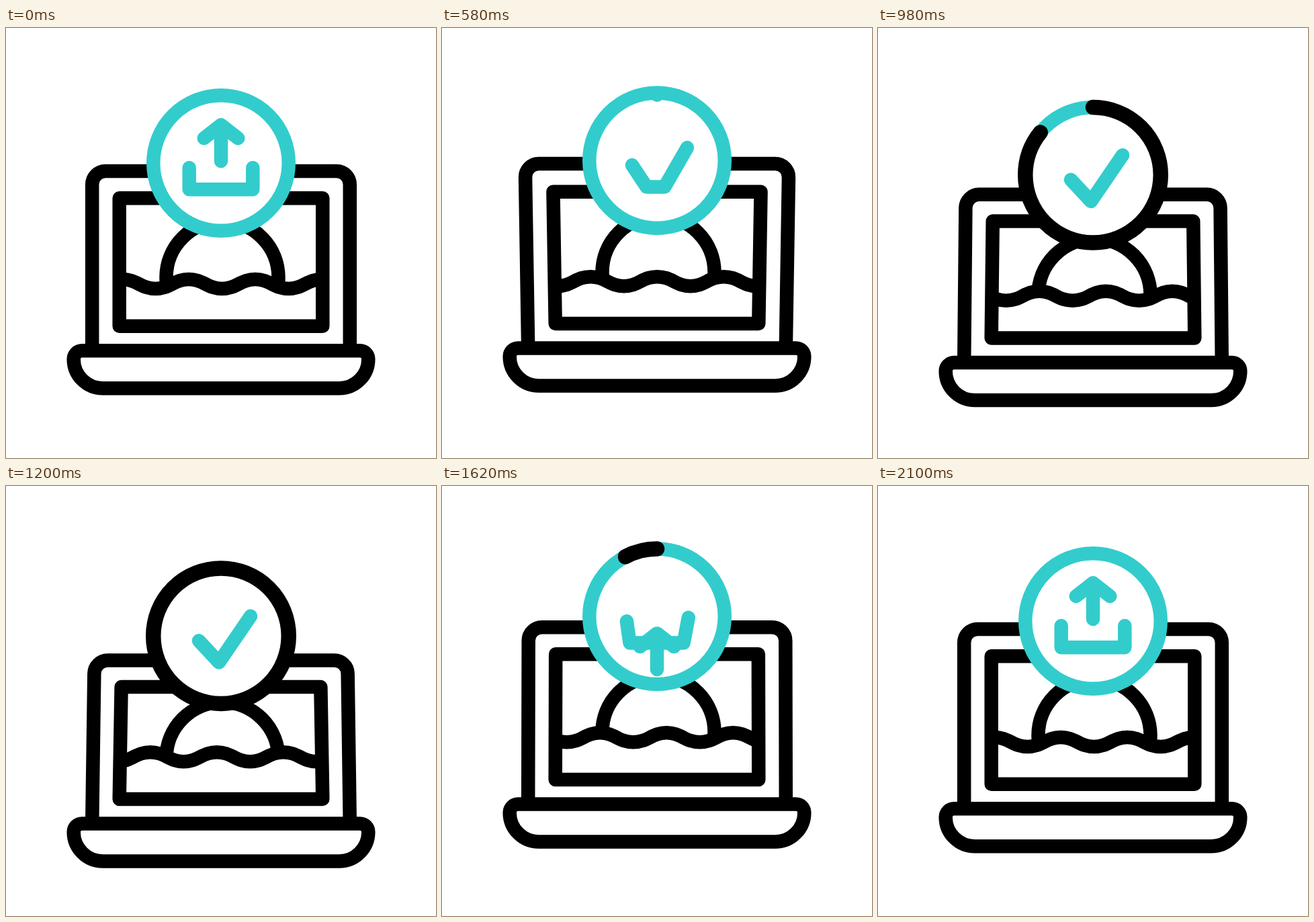
An HTML page with a canvas that plays this animation: 640x640 px, repeating every 2300 ms.

```html
<!DOCTYPE html>
<html lang="en">
<head>
<meta charset="utf-8">
<title>Upload</title>
<style>
html, body { margin: 0; height: 100%; overflow: hidden; background: #fff; }
canvas { display: block; width: 100vw; height: 100vh; object-fit: contain; }
</style>
</head>
<body>
<canvas width="640" height="640"></canvas>
<script>
const ctx = document.querySelector('canvas').getContext('2d');
const TEAL = '#33cccc', LOOP = 2300, LINE = 20.5, RING = 100.75, WAVE = 99;

const progress = (t, from, to) => Math.min(1, Math.max(0, (t - from) / (to - from)));

// Sine ease from 0 to 1; skew below 1 leans towards the start, above 1 towards the end.
const ease = (t, from, to, skew = 1) =>
  (1 - Math.cos(Math.PI * progress(t, from, to) ** skew)) / 2;

// The whole icon jumps, sinks, jumps again and settles; the lid follows a little later.
const bob = t => -12.4 * ease(t, 220, 430) + 34.9 * ease(t, 440, 1280, 0.62)
  - 35.5 * ease(t, 1300, 1700, 1.45) + 13 * ease(t, 1700, 2100, 0.66);
const lean = t => -9 * ease(t, 280, 520) + 34 * ease(t, 520, 1290, 0.75)
  - 33.5 * ease(t, 1300, 1780, 1.33) + 8.5 * ease(t, 1780, 2100, 0.68);

// Four wavelengths, halfway between steady and eased.
const drift = t => 2 * WAVE * (progress(t, 320, 1830) + ease(t, 320, 1830));

// The arrow leaves through the top and comes back from below.
const arrow = t => t < 1000
  ? 8 * ease(t, 220, 350) - 148 * ease(t, 350, 680, 1.3)
  : 185 - 197 * ease(t, 1450, 1780) + 12 * ease(t, 1780, 2100, 0.9);
const tick = t => ease(t, 330, 720) - ease(t, 1300, 1730);
const dip = t => 5 * (ease(t, 220, 320) - ease(t, 320, 420));

function stroke(color = '#000', width = LINE) {
  ctx.strokeStyle = color;
  ctx.lineWidth = width;
  ctx.stroke();
}

function polyline(...points) {
  ctx.beginPath();
  points.forEach(p => ctx.lineTo(...p));
}

function disc(x, y, r) {
  ctx.beginPath();
  ctx.arc(x, y, r, 0, 2 * Math.PI);
}

function drawBase() {
  ctx.beginPath();
  ctx.roundRect(100.7, 480.3, 438.6, 56, [12.4, 12.4, 43.4, 43.4]);
  ctx.fillStyle = '#fff';
  ctx.fill();
  stroke();
}

function drawLid(dy) {
  const dx = dy * (dy < 0 ? 0.62 : 0.14), top = 213 + dy;
  ctx.beginPath();
  ctx.moveTo(128.2, 480);
  ctx.arcTo(128.2 + dx, top, 320, top, 20);
  ctx.arcTo(511.8 - dx, top, 511.8, 480, 20);
  ctx.lineTo(511.8, 480);
  stroke();
}

function drawSun(dy) {
  ctx.save();
  ctx.beginPath();
  ctx.rect(0, 0, 640, 381);
  ctx.clip();
  disc(322, 371 + dy / 2, 83.5);
  stroke();
  ctx.restore();
}

function drawWaves(shift) {
  const half = WAVE / 2;
  ctx.beginPath();
  for (let i = 0; i < 12; i++) {
    const x = 74 + shift % WAVE + (i - 2) * half, y = i % 2 ? 388 : 374;
    ctx.lineTo(x, y);
    ctx.bezierCurveTo(x + 22, y, x + half - 22, 762 - y, x + half, 762 - y);
  }
  stroke();
}

function drawScreen(dy, shift) {
  const dx = dy * (dy < 0 ? 0.45 : 0.12), top = 253.2 + dy * (dy < 0 ? 0.78 : 0.97);
  const frame = () => {
    polyline([168.7, 443.8], [168.7 + dx, top], [471.3 - dx, top], [471.3, 443.8]);
    ctx.closePath();
  };
  ctx.save();
  frame();
  ctx.clip();
  drawSun(dy);
  drawWaves(shift);
  ctx.restore();
  frame();
  stroke();
}

// Upload tray that folds into a check mark.
function drawTray(t) {
  const m = tick(t), drop = dip(t), mix = (a, b) => a + (b - a) * m;
  polyline([mix(-47.3, -33), 7 + drop], [mix(-47.3, -3), 39.3],
           [mix(47.3, -3), 39.3], [mix(47.3, 44), mix(7, -29.5) + drop]);
  stroke(TEAL);
}

function drawArrow(y) {
  ctx.save();
  disc(0, 0, RING);
  ctx.clip();
  ctx.translate(0, y);
  polyline([-25.3, -37], [0, -56.7], [25.3, -37]);
  ctx.moveTo(0, -56.7);
  ctx.lineTo(0, -3);
  stroke(TEAL);
  ctx.restore();
}

function drawProgress(from, to) {
  if (from >= to) return;
  const angle = p => (p - 0.25) * 2 * Math.PI;
  ctx.beginPath();
  ctx.arc(0, 0, RING, angle(from), angle(to));
  stroke('#000', 22.5);
}

function drawBadge(t) {
  ctx.save();
  ctx.translate(320, 201);
  disc(0, 0, RING);
  ctx.fillStyle = '#fff';
  ctx.fill();
  stroke(TEAL);
  drawTray(t);
  drawArrow(arrow(t));
  drawProgress(ease(t, 1300, 1690), ease(t, 590, 1107));
  ctx.restore();
}

function draw(now) {
  const t = Math.floor(now % LOOP / 20) * 20, dy = lean(t);
  ctx.fillStyle = '#fff';
  ctx.fillRect(0, 0, 640, 640);
  ctx.lineJoin = 'round';
  ctx.save();
  ctx.translate(0, bob(t));
  ctx.lineCap = 'butt';
  drawLid(dy);
  drawScreen(dy, drift(t));
  drawBase();
  ctx.lineCap = 'round';
  drawBadge(t);
  ctx.restore();
}

let start;
function loop(now) {
  start ??= now;
  draw(now - start);
  requestAnimationFrame(loop);
}
draw(0);
requestAnimationFrame(loop);
</script>
</body>
</html>
```
